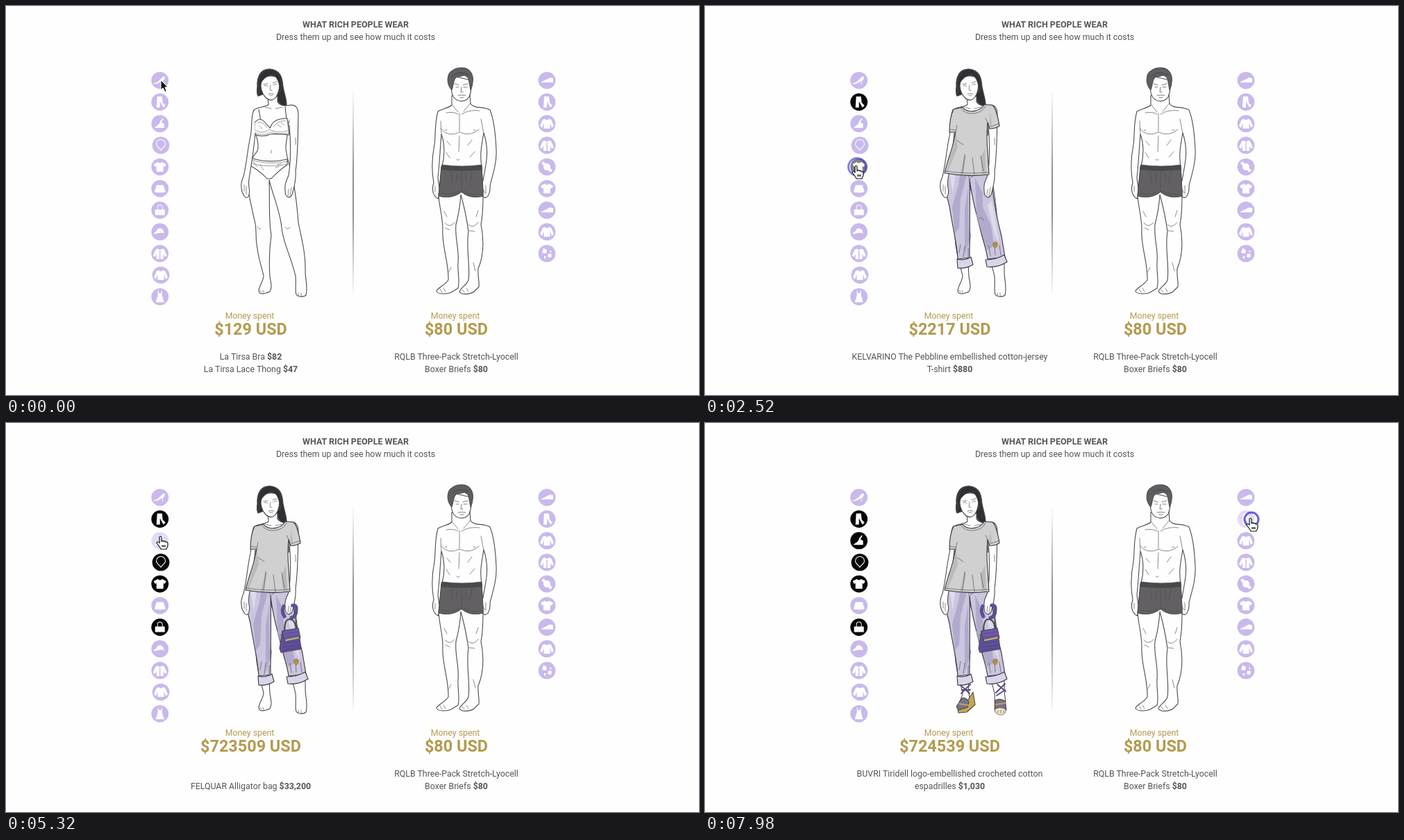
These frames come from a looping animation (998x561 px, 8 s). An HTML page:

```html
<!DOCTYPE html>
<html lang="en">
<head>
<meta charset="utf-8">
<title>What rich people wear</title>
<style>
html, body { margin: 0; width: 100%; height: 100%; overflow: hidden; background: #fefefe; }
svg { display: block; width: 998px; height: 561px; }
text { font: 12.35px Roboto, sans-serif; fill: #555; text-anchor: middle; }
.bold { font-weight: 700; }
.gold { fill: #b39a4e; }
.sum { font-size: 23.4px; font-weight: 700; fill: #b39a4e; }
.line path { fill: none; stroke: #4c4b4f; stroke-width: 1.1; stroke-linejoin: round; stroke-linecap: round; }
.line .skin { fill: #fefefe; }
.line .thin { stroke-width: .65; }
.line .shade { stroke: none; }
.hidden { display: none; }
</style>
</head>
<body>
<svg viewBox="0 0 998 561">
  <defs>
    <linearGradient id="fade" x2="0" y2="1">
      <stop offset="0" stop-color="#222" stop-opacity="0"/>
      <stop offset=".4" stop-color="#222"/><stop offset=".6" stop-color="#222"/>
      <stop offset="1" stop-color="#222" stop-opacity="0"/>
    </linearGradient>
  </defs>
  <text x="503.5" y="30.5" class="bold" style="font-size:12.5px">WHAT RICH PEOPLE WEAR</text>
  <text x="503.5" y="49">Dress them up and see how much it costs</text>
  <rect x="499.5" y="120" width="1" height="300" fill="url(#fade)"/>

  <g class="line" id="woman">
    <path style="fill:#302f33" d="M380 91C367 90 361 102 362 116 361 122 361 126 363 130L371 127 389 124C389 135 394 145 404 145 405 136 401 128 399 116 398 101 394 92 380 91Z"/>
    <path class="skin" d="M377 132L378 142C372 147 362 145 357 150 354 157 356 168 358 178 361 190 365 200 362 209 356 217 349 226 347 238 346 262 354 290 359 314 361 326 359 336 362 350 364 367 369 378 371 390 370 398 364 404 364 411 365 418 375 414 380 412 384 405 381 398 380 390 379 375 379 352 382 330 378 310 380 280 379 251 385 275 395 297 397 320 399 342 412 365 417 390 418 402 416 410 418 416 421 420 429 420 432 417 435 405 431 395 431 383 432 355 424 330 421 312 419 285 416 262 411 240 407 225 403 215 403 203 404 190 407 178 407 168 412 155 415 147 409 143 401 145 393 143 391 138L391 130Z"/>
    <path class="thin" d="M373 146L382 148M388 148L398 146M382 208V212M366 410L368 413M370 410L371 413M421 414V418M425 414V419M362 318Q365 324 367 321M402 319Q406 324 409 319"/>
    <g id="lingerie">
      <path d="M364 149L367 166M402 145L404 164"/>
      <path class="skin" d="M358 168Q366 159 373 168L380 176Q384 165 395 163L405 162 408 186Q395 184 381 185 368 190 358 185Z"/>
      <path class="thin" stroke-dasharray="2 1.4" d="M358 178Q369 186 379 178 394 185 407 179M359 183Q371 188 381 182 395 186 408 183M363 168Q370 166 376 176M385 174Q394 164 403 166M365 173L369 177M391 171L397 175M396 168L401 172"/>
      <path class="skin" d="M350 218Q376 228 405 221L405 229Q394 236 382 249L376 249Q363 235 347 228Z"/>
      <path class="thin" stroke-dasharray="2 1.3" d="M351 221Q376 230 405 224M349 226Q377 234 405 228M356 224L362 232M391 229L397 227M366 229L371 237M388 233L394 231"/>
    </g>
    <g id="jeans" class="hidden">
      <path style="fill:#cbc5de;stroke:#38363d" d="M358 207Q380 210 403 207C407 220 412 237 413 256 416 283 421 309 427 332L432 362 407 365C405 350 400 337 396 320 390 297 383 272 381 249 382 282 381 318 381 363L364 365C363 343 356 316 352 289 345 263 343 244 350 226Z"/>
      <path class="shade" style="fill:#b2aacc" d="M371 214L378 240 368 278 366 320 360 328 356 290 365 258ZM389 248L400 270 400 290 412 316 416 346 406 352 391 302ZM374 292L379 262 380 340 374 360ZM405 226L411 258 406 251Z"/>
      <path class="shade" style="fill:#dfdaec" d="M352 240L362 232 357 271ZM407 287L413 280 424 342 417 330ZM385 224L397 224 391 238Z"/>
      <path class="thin" d="M358 212Q380 216 404 212M379 209L380 248M384 214Q386 231 380 237M358 215Q361 225 352 226M397 214Q401 226 408 225M366 356L368 344M372 362L374 346M379 362L379 350M411 360L409 346M418 359L417 344M426 359L424 345M394 307Q398 302 401 309M382 248Q387 243 396 241"/>
      <path style="fill:#dad5e8;stroke:#38363d" d="M363 365Q373 368 383 362L386 373Q376 379 364 378ZM404 366Q418 366 431 359L435 369Q421 378 406 376Z"/>
      <path style="fill:#b9984a;stroke:#74613b;stroke-width:.6" d="M415 342Q418 338 421 342 422 347 418 349 414 347 415 342M416 345L420 343"/>
    </g>
    <g>
      <path class="skin" d="M357 150C352 160 355 175 352 188 348 205 347 225 342 246 337 256 338 268 344 275 348 280 352 272 350 262 349 255 349 252 351 243 354 225 357 205 359 183"/>
      <path class="skin" d="M409 143C419 142 421 149 421 158 420 185 421 210 417 238 418 250 415 262 412 272 408 279 402 276 402 266 401 256 404 252 407 244 410 225 410 195 408 172"/>
      <path class="thin" d="M343 258V267M346 260V271M407 264L406 274M411 262L409 273M417 190V200"/>
    </g>
    <g id="shirt" class="hidden">
      <path style="fill:#d0d0d0;stroke:#38363d" d="M371 146Q374 151 383 152 398 151 402 142L414 143Q420 148 424 173 418 177 410 177L407 168Q405 190 407 209L409 243Q377 247 345 241C349 222 357 206 361 182L352 182C352 169 354 157 358 149Z"/>
      <path class="shade" style="fill:#bababa" d="M362 186L364 204 354 228 349 240 347 240ZM374 212L376 218 371 243 367 243ZM403 205L405 242 399 243 397 220ZM411 153L413 174 409 172Z"/>
      <path class="thin" d="M368 147Q374 156 386 155 400 154 404 144M353 178L361 179M411 174L423 170M361 182L363 172M407 168L404 162M346 238Q377 243 408 240M371 241L374 215M388 243L385 219M401 238L397 216M363 194L372 200"/>
    </g>
    <g id="bag" class="hidden">
      <path style="stroke:#5f4f9c;stroke-width:5" d="M400 264Q396 272 401 279M413 263Q419 262 418 270 418 279 411 281"/>
      <path class="thin" d="M398 268L402 277M413 264L418 279M419 266L412 281"/>
      <path style="stroke-width:2.2" d="M401 301Q401 283 408 283 417 283 418 299"/>
      <path style="fill:#5f4f9c" d="M398 300L421 296 425 326 396 331 394 325Z"/>
      <path style="fill:#6c5ba8" d="M398 300L421 296 424 310 401 314Z"/>
      <path style="stroke:#44366e" class="thin" stroke-dasharray="2 1.5" d="M402 304L420 301M402 309L421 306M399 318L421 315M399 323L422 320M399 328L422 324"/>
      <path style="fill:#cbb77d" class="thin" d="M402 312L422 308V311L402 315Z"/>
    </g>
    <g id="shoes" class="hidden">
      <path style="stroke:#594986;stroke-width:1.9" d="M368 378L381 390M382 377L369 390M370 385H382M421 377L433 387M432 376L419 389M420 393L432 385"/>
      <path style="fill:#c7a553" d="M379 399L386 388 389 406 377 417 365 418 364 412Z"/>
      <path style="fill:#77708f" d="M369 398Q374 393 380 402L378 410 365 414 362 409ZM418 400Q425 396 432 401L434 414 418 413Z"/>
      <path style="stroke:#c7a553;stroke-width:2" d="M366 405L379 407M419 406L432 404"/>
      <path style="fill:#eee4c6" class="thin" d="M417 413Q425 408 433 413 434 420 426 421 418 421 417 413Z"/>
      <path class="thin" d="M422 415V418M426 414V418M430 415V418"/>
    </g>
    <path class="skin" d="M367 107C366 118 369 127 374 132 379 137 385 137 389 131 393 125 395 115 393 106 388 99 374 99 367 107Z"/>
    <path style="fill:#302f33;stroke-width:.7" d="M364 126C362 106 366 93 380 91 392 92 397 103 397 118L394 125C395 113 391 104 385 98 378 100 371 104 368 110Z"/>
    <path class="thin" d="M371 113L377 112M384 111L390 109M372 115Q375 113 377 116M385 114Q388 111 390 113M381 114L380 121 383 122M378 127Q382 125 386 127M380 129L384 129"/>
  </g>

  <g class="line" id="man">
    <path class="skin" d="M642 129V143C636 148 628 148 622 152 617 170 619 184 617 200 613 220 613 239 616 255 613 263 614 273 622 278L625 270 622 248C624 230 625 210 627 185 632 198 632 217 628 231L623 273C624 290 629 305 629 322 627 345 638 370 637 395 632 403 622 406 620 411 621 416 635 416 641 413L651 407C654 397 650 383 651 370 653 350 646 335 648 315 652 300 654 288 655 272 660 290 664 310 666 325 662 350 669 375 666 395 664 402 654 407 653 412 656 417 668 416 674 412L681 405C682 397 679 389 680 379 690 355 687 330 684 315 687 300 687 288 687 273L685 231C682 214 685 200 688 183 693 198 694 213 691 229L687 252C682 260 682 269 687 275 693 280 698 270 697 259 701 243 707 226 706 207 705 185 702 162 697 150 688 144 675 149 669 141L668 128Z"/>
    <path class="thin" d="M626 177Q637 190 653 182 669 189 681 178M653 155V181M653 187L652 210M634 154Q645 152 651 156M656 156Q667 149 682 151M643 143L651 153M669 140L659 152M627 186L626 166M688 184L684 163M649 221Q651 224 653 221M635 195L640 201M671 193L665 201M634 211L639 219M675 210L668 218M632 313Q639 321 646 312M633 320L639 323M666 315Q672 322 680 312M667 324L675 325M631 296L635 304M680 295L677 304M638 383L641 377M676 382L673 370M618 260V268M686 263L690 270M691 259V270M625 408L628 413M630 407L633 412M657 409L660 413M663 407L666 412M632 179H635M673 179H676"/>
    <path style="fill:#626063" d="M627 231Q657 235 685 231L687 266 687 274Q669 279 656 268 642 279 623 274Z"/>
    <path style="fill:#49484b;stroke-width:.7" d="M628 229Q657 233 685 229V236Q656 239 627 236Z"/>
    <path class="thin" d="M641 239L643 254M656 238V268M671 239L668 255M627 270Q643 274 652 267M659 267Q671 274 684 271M650 241L649 253M662 241L663 253"/>
    <path class="skin" d="M642 109C640 119 642 128 645 132 651 139 662 139 667 131 670 124 671 116 669 107L644 101Z"/>
    <path style="fill:#605e61" d="M642 121C634 113 634 98 643 93 651 87 664 88 669 95 674 101 673 113 669 121L667 110C667 104 664 101 660 100L648 103C644 106 645 113 642 121Z"/>
    <path class="thin" style="stroke:#353438" d="M642 102Q651 92 667 99M646 112L652 114M658 114L665 112M648 117H652M659 117H664M656 117L655 124 658 124M651 129Q657 128 662 129M654 132H659"/>
  </g>

  <g id="icons"></g>
  <text x="351" y="451" class="gold">Money spent</text>
  <text x="647" y="451" class="gold">Money spent</text>
  <text x="352.5" y="473.5" class="sum" id="total"></text>
  <text x="648.5" y="473.5" class="sum">$80 USD</text>
  <text x="352.5" y="509.5" id="first"></text>
  <text x="352.5" y="528" id="second"></text>
  <text x="648.5" y="509.5">RQLB Three-Pack Stretch-Lyocell</text>
  <text x="648.5" y="528">Boxer Briefs <tspan class="bold">$80</tspan></text>

  <circle id="ring" fill="none" stroke="#3f3ad6" stroke-width="3"/>
  <path id="arrow" fill="#111" stroke="#fff" d="M0 0V14L3 11 6 17 8 16 6 10H10Z"/>
  <path id="hand" fill="#fff" stroke="#111" stroke-width="1.2" stroke-linejoin="round" d="M-2 1C-2-1 1-1 1 1V7C2 5 4 6 4 7 5 6 7 6 7 8 9 7 10 8 10 10V13C10 15 8 16 8 18H0C-1 15-4 12-6 9-6 7-4 7-2 9ZM2 12V15M4 12V15M6 12V15"/>
</svg>
<script>
const $ = id => document.getElementById(id);
const STEP = 140, LOOP = 8000;

const glyphs = {
  heel: 'M-9 4C-4 4-1 0 5-6L7-5C7-2 6 0 4 1V6H3V1C-1 3-3 6-9 5Z',
  trousers: 'M-4-8H3L4 1 8 5 5 8 0-1V8H-5Z',
  wedge: 'M-8 6C-4 2-1 2 0-3L4-8 5-7 2-2 6 0V6Z',
  necklace: 'M0 8C-3 3-7 2-7-2A7 7 0 0 1 7-2C7 2 3 3 0 8ZM0 6C2 3 6 1 6-2A6 6 0 0 0-6-2C-6 1-2 3 0 6Z',
  tee: 'M-3-7Q0-4 3-7L9-4 7 0 5-1V7H-5V-1L-7 0-9-4Z',
  skirt: 'M-5-5H5L8 5Q0 7-8 5Z',
  handbag: 'M-7-1H7V7H-7ZM-4-1V-4A4 4 0 0 1 4-4V-1H3V-4A3 3 0 0 0-3-4V-1Z',
  cap: 'M-5-1C-4-7 5-7 6 2 0 0-3 3-9 3-9 1-7 0-5-1Z',
  coat: 'M-3-7L0-5 3-7 6-6 10 3 7 5 5 0V8H.7V-4H-.7V8H-5V0L-7 5-10 3-6-6Z',
  sweater: 'M-3-7Q0-4 3-7L6-6 10 3 7 6 4.5-1V7H-4.5V-1L-7 6-10 3-6-6Z',
  dress: 'M-3-9H-2V-6Q0-4 2-6V-9H3V-2L6 8H-6L-3-2Z',
  shoe: 'M-9 3C-5 0 0-1 4-4L9-3V3Z',
  watch: 'M-8-5L-5-8 8 5 5 8ZM5 0A5 5 0 1 1-5 0 5 5 0 1 1 5 0Z',
  cufflinks: 'M-5-8L0-5-1 0-7-1ZM2 0L7 1 6 6 1 5ZM4-5L7-3 5-1ZM-4 3L-1 5-4 8Z'
};
const left = 'heel trousers wedge necklace tee skirt handbag cap coat sweater dress'.split(' ');
const right = 'shoe trousers sweater coat watch tee shoe sweater cufflinks'.split(' ');

const icons = [left, right].flatMap((names, side) => names.map((name, i) => {
  const x = side ? 779 : 222 + (/necklace|sweater/.test(name) ? 1 : -.3), y = 107.3 + 31.2 * i;
  const g = document.createElementNS('http://www.w3.org/2000/svg', 'g');
  g.setAttribute('transform', `translate(${x} ${y})`);
  g.innerHTML = `<circle r="12.4"/><path fill="#fff" fill-rule="${name == 'necklace' ? 'evenodd' : 'nonzero'}" d="${glyphs[name]}"/>`;
  $('icons').append(g);
  return { g, x, y, name: side ? '' : name };
}));

// Each purchase: when it shows, counter progress at that moment, and its caption
const purchases = [
  { at: 0, price: 129, done: 1, lines: [['La Tirsa Bra', '$82'], ['La Tirsa Lace Thong', '$47']] },
  { at: 840, price: 1300, done: .3, icon: 'trousers', wear: 'jeans',
    lines: [['Jeans BUVRI Embroidered distressed high-rise'], ['straight-leg jeans', '$1,300']] },
  { at: 2520, price: 880, done: .8955, icon: 'tee', wear: 'shirt',
    lines: [['KELVARINO The Pebbline embellished cotton-jersey'], ['T-shirt', '$880']] },
  { at: 3780, price: 688000, done: 1, icon: 'necklace', lines: [[''], ['Dorvani Cascelli Necklace', '$688,000']] },
  { at: 4760, price: 33200, done: 1, icon: 'handbag', wear: 'bag', lines: [[''], ['FELQUAR Alligator bag', '$33,200']] },
  { at: 6440, price: 1030, done: 1, icon: 'wedge', wear: 'shoes',
    lines: [['BUVRI Tiridell logo-embellished crocheted cotton'], ['espadrilles', '$1,030']] }
];
// Click rings: start, end, progress at start
const rings = [[700, 1400, .2], [2520, 3220, .42], [3780, 4060, .93], [4760, 5180, .4], [7840, 8000, .03]];
// Pointer stops: time, x, y
const path = [[0, 223, 107], [420, 222, 140], [1400, 222, 140], [1540, 221, 152], [1680, 220, 165],
  [2240, 218, 231], [3220, 218, 231], [3500, 224, 202], [4340, 224, 202], [4620, 227, 284],
  [4760, 227, 295], [5040, 227, 295], [5320, 223, 164], [6580, 223, 164], [6860, 270, 170],
  [7280, 690, 158], [7420, 775, 150], [7560, 791, 143], [7700, 786, 138], [8000, 786, 138]];

function pointer(t) {
  const i = path.findIndex(p => p[0] > t), [t0, x0, y0] = path[i - 1], [t1, x1, y1] = path[i];
  const k = (t - t0) / (t1 - t0);
  return [x0 + (x1 - x0) * k, y0 + (y1 - y0) * k];
}

const caption = ([text, price]) => text + (price ? ` <tspan class="bold">${price}</tspan>` : '');

function draw(now) {
  const t = Math.floor(now % LOOP / STEP) * STEP;
  const bought = purchases.filter(p => p.at <= t);
  const total = bought.reduce((sum, p) => sum + p.price * Math.min(1, p.done + .25 * (t - p.at) / STEP), 0);
  const [first, second] = bought.at(-1).lines;
  $('total').textContent = `$${Math.round(total)} USD`;
  $('first').innerHTML = caption(first);
  $('second').innerHTML = caption(second);
  for (const p of purchases) if (p.wear) $(p.wear).classList.toggle('hidden', p.at > t);

  const [x, y] = pointer(t);
  let over = false;
  for (const icon of icons) {
    const hover = t > 0 && Math.hypot(icon.x - x, icon.y - y) < 14.5;
    over ||= hover;
    icon.g.setAttribute('opacity', hover ? .5 : 1);
    icon.g.setAttribute('fill', bought.some(p => p.icon && p.icon == icon.name) ? '#050505' : '#c9b9ec');
  }
  for (const [id, on] of [['hand', over], ['arrow', !over]]) {
    $(id).classList.toggle('hidden', !on);
    $(id).setAttribute('transform', `translate(${x} ${y})`);
  }

  const live = rings.find(([start, end]) => t >= start && t < end);
  $('ring').classList.toggle('hidden', !live);
  if (live) {
    const p = Math.min(.95, live[2] + .2 * (t - live[0]) / STEP);
    for (const [key, value] of Object.entries({ cx: x + 1, cy: y + 1, r: 7 + 13 * p, opacity: 1 - .85 * p }))
      $('ring').setAttribute(key, value);
  }
}

const begin = performance.now();
(function tick() {
  draw(performance.now() - begin);
  requestAnimationFrame(tick);
})();
</script>
</body>
</html>
```
